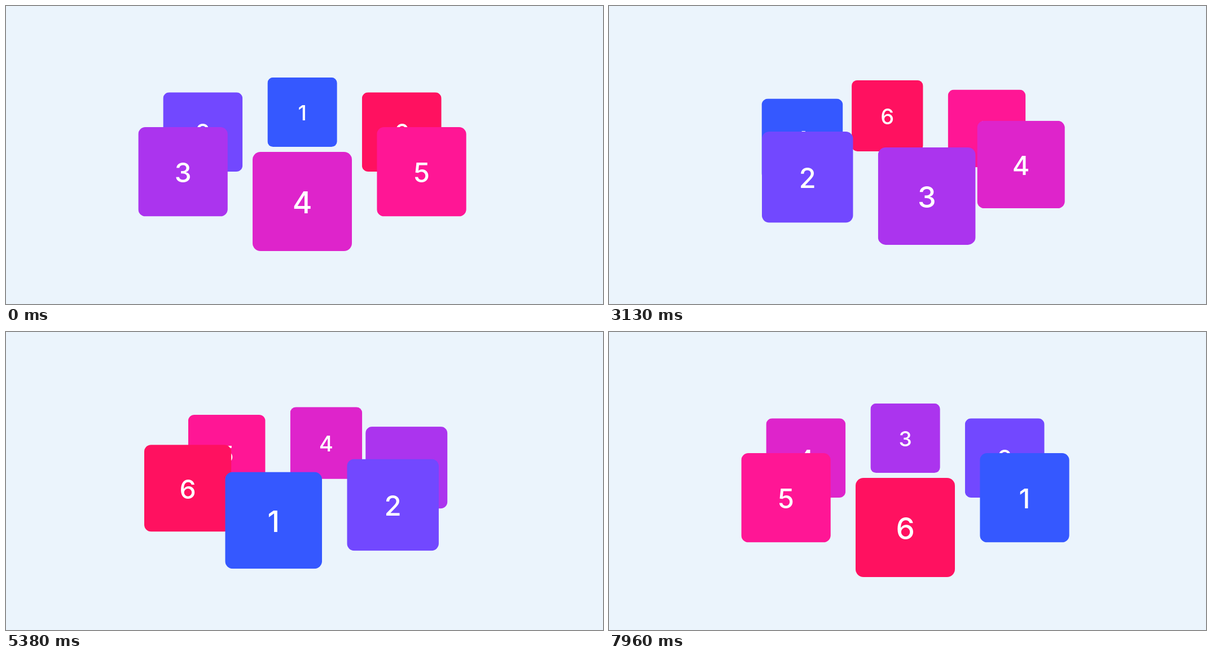
These frames come from a looping animation (1058x529 px, 8 s). An HTML page:

```html
<!DOCTYPE html>
<html lang="en">
<head>
<meta charset="utf-8">
<title>Card carousel</title>
<style>
  html, body { margin: 0; width: 100%; height: 100%; overflow: hidden; background: #ebf4fc; }
  .card {
    position: absolute;
    left: 436.5px;
    top: 259.4px;
    width: 176.2px;
    height: 176.2px;
    box-sizing: border-box;
    padding-top: 4px;
    border-radius: 14px;
    display: flex;
    align-items: center;
    justify-content: center;
    color: #fff;
    font: 500 53px/1 Inter, sans-serif;
  }
</style>
</head>
<body>
<script>
  const LOOP = 8000, FPS = 24;
  const FIRST = 1007, PERIOD = 2000, MOVE = 800, TURNS = 4;
  const COLORS = ['#3558ff', '#7248ff', '#ab34ee', '#de24cb', '#ff1695', '#ff1160'];

  // x and y in percent of a card, then scale; clockwise seen from the front
  const SLOTS = [
    [0, 0, 1], [120, -30, 0.9], [100, -70, 0.8],
    [0, -90, 0.7], [-100, -70, 0.8], [-120, -30, 0.9]
  ];

  function pose(slot, time, easing = 'linear') {
    const [x, y, scale] = SLOTS[slot % SLOTS.length];
    return {
      transform: `translate(${x}%, ${y}%) scale(${scale})`,
      zIndex: Math.round(scale * 100),
      offset: time / LOOP,
      easing
    };
  }

  function track(slot) {
    const frames = [pose(slot, 0)];
    for (let turn = 0; turn < TURNS; turn++) {
      const start = FIRST + turn * PERIOD;
      frames.push(pose(slot + turn, start, 'ease'), pose(slot + turn + 1, start + MOVE));
    }
    frames.push(pose(slot + TURNS, LOOP));
    return frames;
  }

  const moves = COLORS.map((color, i) => {
    const card = document.createElement('div');
    card.className = 'card';
    card.textContent = i + 1;
    card.style.background = color;
    document.body.append(card);
    const move = card.animate(track(i + 3), { duration: LOOP, fill: 'both' });
    move.pause();
    return move;
  });

  const begin = performance.now();

  function draw() {
    const time = (performance.now() - begin) % LOOP;
    const step = Math.floor((time + 5) * FPS / 1000);
    const shown = (step * 1000 / FPS) % LOOP;
    for (const move of moves) move.currentTime = shown;
    requestAnimationFrame(draw);
  }
  draw();
</script>
</body>
</html>
```
